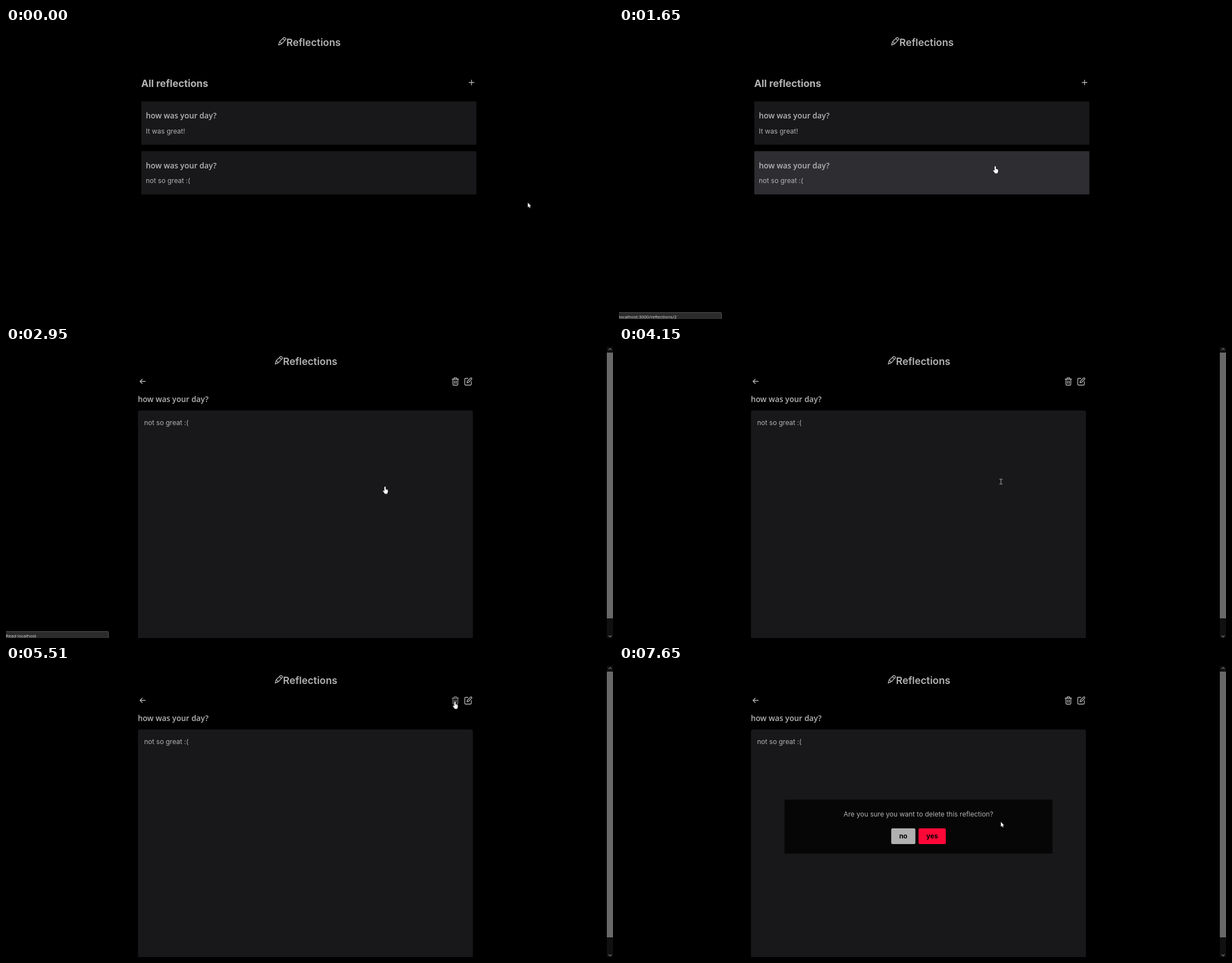
An HTML page that plays this animation: 1081 px wide and 518 px high, repeating every 7.99 s.

```html
<!DOCTYPE html>
<html lang="en">
<head>
<meta charset="utf-8">
<title>Reflections</title>
<style>
html, body { margin: 0; width: 100%; height: 100%; overflow: hidden; background: #000; }
svg { display: block; width: 100%; height: 100%; }
text { fill: #b3b3b3; font: 400 12px Inter, sans-serif; white-space: pre; }
.brand { font-size: 17.8px; font-weight: 600; }
.section { font-size: 17.6px; font-weight: 700; }
.question { font: 600 13.8px "Open Sans", sans-serif; }
.mid { text-anchor: middle; }
.button { font-weight: 700; fill: #050505; text-anchor: middle; }
.status { font: 400 8px "Open Sans", sans-serif; fill: #dedede; }
.icon { fill: none; stroke: #b3b3b3; stroke-width: 1.4; stroke-linecap: round; stroke-linejoin: round; }
.panel { fill: #18181a; }

/* Everything runs on one shared 7990 ms clock. */
.timed { animation: 7990ms step-end infinite; }
#list { animation-name: list; }
#detail { animation-name: detail; }
#hovered { animation: hovered 7990ms linear infinite; }
#bubble { animation-name: bubble; }
#link { animation-name: link; }
#reading { animation-name: reading; }
#dialog { animation-name: dialog; }
#trash { animation-name: trash; }
#pointer { animation: travel 7990ms linear infinite; }
#arrow { animation-name: arrow; }
#hand { animation-name: hand; }
#beam { animation-name: beam; }

@keyframes list { 0% { opacity: 1 } 36.92%, 100% { opacity: 0 } }
@keyframes detail { 0% { opacity: 0 } 36.92%, 100% { opacity: 1 } }
@keyframes hovered { 0%, 14.45% { fill: #18181a } 16.3%, 100% { fill: #2e2d32 } }
@keyframes bubble { 0% { opacity: 0 } 16.02% { opacity: 1 } 37.67%, 100% { opacity: 0 } }
@keyframes link { 0% { opacity: 1 } 36.04%, 100% { opacity: 0 } }
@keyframes reading { 0% { opacity: 0 } 36.04%, 100% { opacity: 1 } }
@keyframes dialog { 0% { opacity: 0 } 79.22%, 100% { opacity: 1 } }
@keyframes trash { 0% { stroke: #b3b3b3 } 68% { stroke: #858585 } 86%, 100% { stroke: #b3b3b3 } }

@keyframes arrow {
  0% { opacity: 1 } 14.35% { opacity: 0 } 58.7% { opacity: 1 } 68% { opacity: 0 }
  86% { opacity: 1 } 88% { opacity: 0 } 92.7%, 100% { opacity: 1 }
}
@keyframes hand {
  0% { opacity: 0 } 14.35% { opacity: 1 } 37.67% { opacity: 0 } 68% { opacity: 1 } 86%, 100% { opacity: 0 }
}
@keyframes beam {
  0% { opacity: 0 } 37.67% { opacity: 1 } 58.7% { opacity: 0 } 88% { opacity: 1 } 92.7%, 100% { opacity: 0 }
}
@keyframes travel {
  0%, 5.76% { transform: translate(929.3px, 310.3px) }
  7.5% { transform: translate(908px, 329px) }
  9.39% { transform: translate(872px, 343px) }
  11.26% { transform: translate(815px, 338px) }
  12.52% { transform: translate(778px, 322px) }
  14.39% { transform: translate(730.5px, 295px) }
  15.65% { transform: translate(701px, 272px) }
  17.52% { transform: translate(680px, 255px) }
  20.65% { transform: translate(670px, 246px); animation-timing-function: step-end }
  30.41% { transform: translate(677px, 241px); animation-timing-function: step-end }
  33.17% { transform: translate(675px, 248.5px); animation-timing-function: step-end }
  51.93% { transform: translate(680px, 240px) }
  54.44% { transform: translate(706px, 195px) }
  57.57% { transform: translate(755px, 126px) }
  59.5% { transform: translate(779px, 97px) }
  61.45%, 62.33% { transform: translate(791px, 82px) }
  63.45%, 66.83% { transform: translate(791px, 80px) }
  68.96%, 85.61% { transform: translate(799.5px, 63.5px) }
  88.86% { transform: translate(775px, 130px) }
  92.62% { transform: translate(712px, 236px) }
  95.37% { transform: translate(680px, 276px) }
  95.74%, 100% { transform: translate(680px, 277px) }
}
</style>
</head>
<body>
<svg viewBox="0 0 1081 518">
  <defs>
    <g id="brand">
      <path class="icon" d="M485.4 30.4 487.3 24.3 494.6 17.2Q495.6 16.3 496.6 17.2L498 18.6Q498.9 19.6 498 20.6L491 28ZM487.3 24.3 491 28M493 18.8 496.4 22.2"/>
      <text class="brand" x="499.3" y="32">Reflections</text>
    </g>
  </defs>

  <g id="list" class="timed">
    <use href="#brand"/>
    <text class="section" x="240.7" y="105.3">All reflections</text>
    <path class="icon" d="M824.7 97H833.5M829.1 92.6V101.4"/>
    <rect class="panel" x="241" y="130.8" width="596.7" height="77" rx="1"/>
    <text class="question" x="249" y="161.3">how was your day?</text>
    <text x="249" y="188">It was great!</text>
    <rect id="hovered" class="panel" x="241" y="219.3" width="596.7" height="77" rx="1"/>
    <text class="question" x="249" y="250">how was your day?</text>
    <text x="249" y="276.4">not so great :(</text>
  </g>

  <g id="detail" class="timed">
    <use href="#brand" x="-6"/>
    <path class="icon" d="M248 61.2H238.8M242.6 57.3 238.7 61.2 242.6 65.1"/>
    <path id="trash" class="icon timed" d="M794.6 57.2H806M796 57.2V66.4Q796 68 797.6 68H803Q804.6 68 804.6 66.4V57.2M797.9 57V55.9Q797.9 54.6 799.2 54.6H801.4Q802.7 54.6 802.7 55.9V57M798.9 60.3V65M801.7 60.3V65"/>
    <path class="icon" d="M822.6 55.8H818.6Q817 55.8 817 57.4V66.2Q817 67.8 818.6 67.8H827Q828.6 67.8 828.6 66.2V61.8M821 63.8 821.6 60.9 827.3 55.2Q828.3 54.5 829.2 55.3 830 56.3 829.3 57.3L823.8 62.9Z"/>
    <text class="question" x="234.7" y="98.3">how was your day?</text>
    <rect class="panel" x="235" y="113" width="596.5" height="420" rx="3"/>
    <text x="246" y="138.7">not so great :(</text>
    <rect x="1070" width="11" height="518" fill="#101010"/>
    <rect x="1070" y="10" width="11" height="473" fill="#686868"/>
    <path d="M1073 5.3 1075.7 2.6 1078.4 5.3M1073 513.5 1075.7 516.2 1078.4 513.5" fill="none" stroke="#777" stroke-width="1.2"/>
  </g>

  <g id="dialog" class="timed">
    <rect x="294.7" y="237.7" width="477.3" height="96.3" rx="2" fill="#060606"/>
    <text class="mid" x="533.3" y="267.5">Are you sure you want to delete this reflection?</text>
    <rect x="484.8" y="289" width="43" height="28" rx="2.5" fill="#b0b0b0"/>
    <text class="button" x="506.3" y="307">no</text>
    <rect x="533.4" y="289" width="48.6" height="28" rx="2.5" fill="#ff0837"/>
    <text class="button" x="557.7" y="307">yes</text>
  </g>

  <g id="bubble" class="timed">
    <rect x="-1" y="506.5" width="183.5" height="13" rx="1" fill="#2b2b2b" stroke="#555"/>
    <text id="link" class="status timed" x="-0.5" y="517">localhost:3000/reflections/2</text>
    <text id="reading" class="status timed" x="-0.5" y="517">Read localhost</text>
  </g>

  <g id="pointer">
    <path id="arrow" class="timed" d="M0 .6V9L2 7.2 3.3 10.3 4.6 9.8 3.3 6.7H5.8Z" fill="#fff" stroke="#000" stroke-width=".8" paint-order="stroke"/>
    <g id="hand" class="timed">
      <path d="M-1.2 1.1Q-1.1 0 0 0T1.2 1.1V4.7L4.3 5.6Q5.3 6 5.2 7.4V9.2L4.3 11.2V12.8H-.9V11.6L-3.6 8.4Q-3.9 6.9-2.6 7L-1.2 8.2Z" fill="#fff" stroke="#000" stroke-width=".9" paint-order="stroke"/>
      <path d="M1.3 5V7M2.8 5.4V7M4.1 5.8V7.2" stroke="#777" stroke-width=".4"/>
    </g>
    <path id="beam" class="timed" d="M-2.8-4.3H-.7L0-3.8.7-4.3H2.8M0-3.8V3.8M-2.8 4.3H-.7L0 3.8.7 4.3H2.8" fill="none" stroke="#d0d0d0" stroke-width=".9"/>
  </g>
</svg>
</body>
</html>
```
